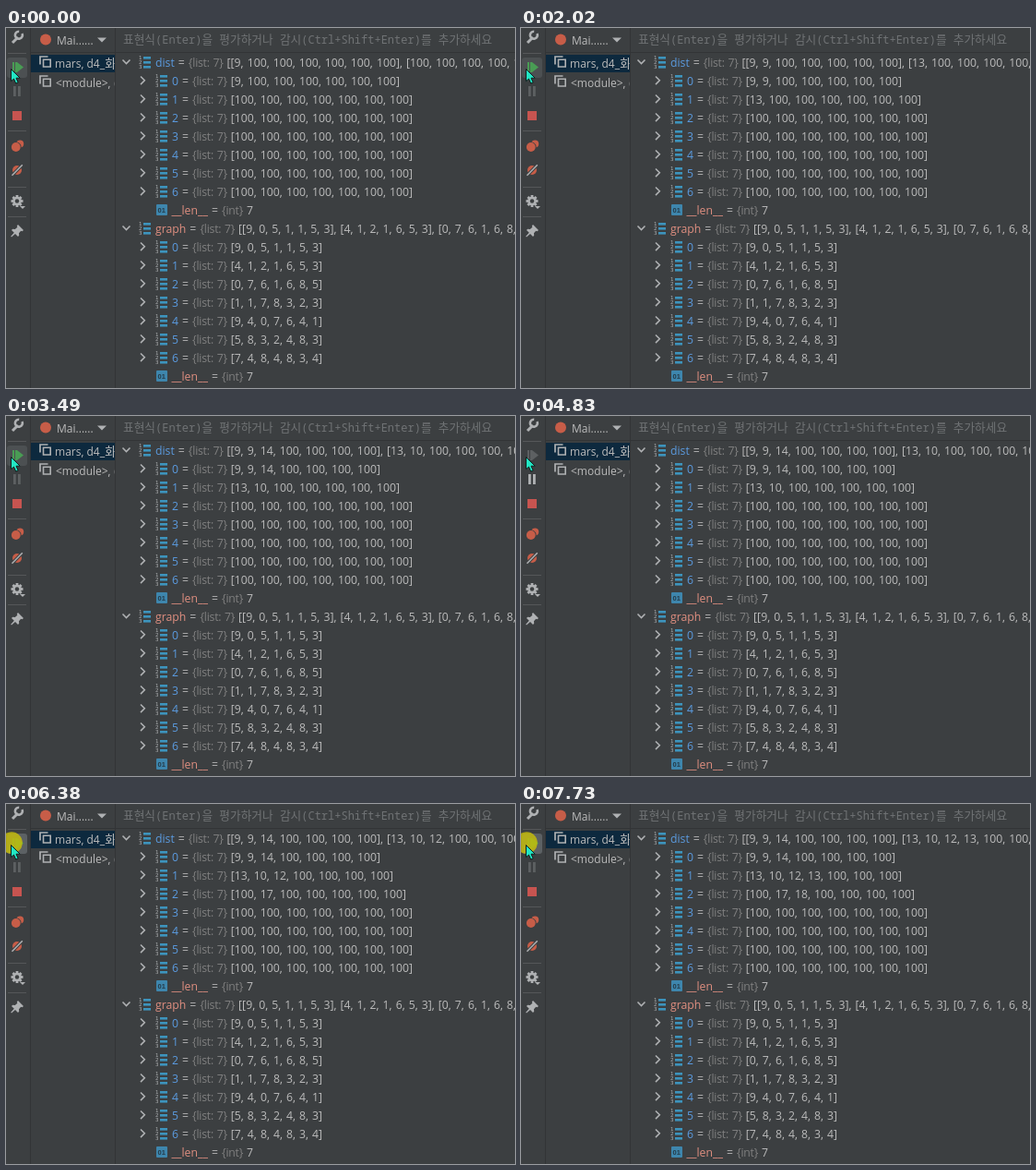
Recreate the animation shown at these times as an HTML page. Size 552 by 390 pixels, loop 7.99 s.

```html
<!DOCTYPE html>
<html lang="ko">
<head>
<meta charset="utf-8">
<title>Debugger</title>
<style>
html, body { margin: 0; width: 100%; height: 100%; overflow: hidden; background: #3c3f41; }
svg { display: block; width: 552px; height: 390px; }
text { font: 12.25px "Open Sans", "Noto Sans CJK KR", sans-serif; word-spacing: .85px; fill: #bbb; white-space: pre; }
.ko { font: 13px "Noto Sans CJK KR", "Noto Sans CJK", sans-serif; }
.small { font-size: 12px; word-spacing: 0; }
.prompt { font: 12px "Noto Sans Mono", "DejaVu Sans Mono", monospace; word-spacing: 0; fill: #707375; }
.prompt .ko { font-size: 12.7px; }
.name { fill: #e08f80; }
.item { fill: #5b9be0; }
.type { fill: #808080; letter-spacing: -.23px; }
.tiny { font: 5.5px "DejaVu Sans", sans-serif; fill: #afb1b3; }
.bits { font: bold 7.5px "Liberation Sans", sans-serif; fill: #253b49; word-spacing: 0; }
</style>
</head>
<body>
<svg id="stage" viewBox="0 0 552 390"></svg>
<script>
const LOOP = 7990;
const GREY = '#afb1b3';
const RED = '#c75d48';

const graph = ['9051153', '4121653', '0761685', '1178323', '9407641', '5832483', '7484834']
  .map(row => [...row]);

// Cells written before each pause: row, column, value
const writes = [
  [[0, 0, 9]],
  [[0, 1, 9], [1, 0, 13]],
  [[0, 2, 14], [1, 1, 10]],
  [[1, 2, 12], [2, 1, 17]],
  [[1, 3, 13], [2, 2, 18]]
];

// Start time, variables view, button state
const steps = [
  [0, 'pause0', 'on'],
  [1470, 'pause0', 'press'], [1600, 'pause0', 'off'], [1670, 'empty', 'off'],
  [1740, 'wait', 'off'], [1810, 'pause1', 'off'], [2020, 'pause1', 'on'],
  [3020, 'pause1', 'press'], [3150, 'pause1', 'off'], [3220, 'empty', 'off'],
  [3290, 'wait', 'off'], [3360, 'pause2', 'off'], [3490, 'pause2', 'on'],
  [4700, 'pause2', 'press'], [4830, 'pause2', 'off'], [4900, 'empty', 'off'],
  [4970, 'wait', 'off'], [5040, 'pause3', 'on'],
  [6380, 'pause3', 'press'], [6510, 'pause3', 'off'], [6580, 'empty', 'off'],
  [6650, 'wait', 'off'], [6720, 'pause4', 'off'], [7050, 'pause4', 'on'],
  [7730, 'pause4', 'press']
];

const escapeText = s => s.replace(/&/g, '&amp;').replace(/</g, '&lt;');
const mixed = s => s.split(/([가-힣]+)/)
  .map((part, i) => i % 2 ? `<tspan class="ko">${part}</tspan>` : escapeText(part)).join('');
const span = (cls, s) => `<tspan class="${cls}">${s}</tspan>`;
const text = (x, y, body, cls = '') => `<text x="${x}" y="${y}" class="${cls}">${body}</text>`;
const rect = (x, y, w, h, fill, r = 0) =>
  `<rect x="${x}" y="${y}" width="${w}" height="${h}" rx="${r}" fill="${fill}"/>`;
const dot = (x, y, r, fill) => `<circle cx="${x}" cy="${y}" r="${r}" fill="${fill}"/>`;
const fillPath = (d, fill) => `<path d="${d}" fill="${fill}"/>`;
const line = (d, color, w) => `<path d="${d}" fill="none" stroke="${color}" stroke-width="${w}"/>`;
const group = (id, body) => `<g id="${id}">${body}</g>`;
const list = row => `[${row.join(', ')}]`;

function listIcon(x, y) {
  return [0, 1, 2].map(i =>
    rect(x + 5, y - 6 + i * 5, 8, 2.6, '#3d94bd') +
    text(x, y - 3 + i * 5, i + 1, 'tiny')).join('');
}

function listRow(x, y, name, value, cls, open) {
  const arrow = open
    ? `M${x - 35.5} ${y - 2.5}l4 4 4-4`
    : `M${x - 34} ${y - 4.5}l4.3 4.3-4.3 4.3`;
  return line(arrow, GREY, 1.6) + listIcon(x - 18, y) +
    text(x, y + 4.5, span(cls, name) + ' = ' + span('type', '{list: 7} ') + value);
}

function tree(y, name, rows, cls) {
  let out = listRow(162, y, name, list(rows.map(list)), cls, true);
  rows.forEach((row, i) => {
    out += listRow(180, y + 20 * (i + 1), i, list(row), 'item', false);
  });
  const end = y + 160;
  return out + rect(163, end - 6, 12, 12, '#3e86ad', 1) + text(164.6, end + 2.8, '01', 'bits') +
    text(179.5, end + 4.5, span('name', '__len__') + ' = ' + span('type', '{int} ') + '7');
}

function pauses() {
  const dist = Array.from({ length: 7 }, () => Array(7).fill(100));
  return writes.map((cells, i) => {
    cells.forEach(([r, c, v]) => { dist[r][c] = v; });
    return group('pause' + i, tree(37, 'dist', dist, 'item') + tree(217, 'graph', graph, 'name'));
  }).join('');
}

function waiting() {
  const note = mixed('데이터 수집 중...');
  return group('wait',
    text(144, 42, span('name', 'dist') + ' = ' + note) +
    text(144, 62, span('name', 'graph') + ' = ' + note) +
    text(144, 82, note));
}

const resume = color =>
  rect(7, 37, 2, 11, color) + rect(10, 37, 2, 11, color) + fillPath('M12 37l7 5.5-7 5.5z', color);
const pauseBars = color => rect(8, 63, 2.8, 11, color) + rect(13, 63, 2.8, 11, color);

function buttons() {
  return group('on', rect(1, 32, 22, 22, '#4c5052', 3) + resume('#499c54') + pauseBars('#5d6062')) +
    group('off', resume('#5d6062') + pauseBars(GREY)) +
    group('press', rect(1, 32, 22, 22, '#5c6164', 3) + resume('#499c54') +
      `<circle cx="6" cy="42" r="11.8" fill="#c8be0a" opacity=".82"/>` +
      pauseBars('#5d6062'));
}

function toolbar() {
  const teeth = [0, 45, 90, 135].map(a =>
    `<rect x="10.6" y="181" width="2.8" height="13" fill="${GREY}" transform="rotate(${a} 12 187.5)"/>`).join('');
  return line('M7 16L13 10', GREY, 3) +
    line('M17.5 6A4 4 0 1 1 14.2 3.7', GREY, 2.6) +
    [27, 111, 172, 204].map(y => rect(2, y, 20, 1, '#555759')).join('') +
    rect(7, 90, 10, 10, '#c75450') +
    dot(15.2, 125.5, 4, RED) + dot(10.8, 129, 5.8, '#3c3f41') + dot(10.8, 129, 4.9, RED) +
    dot(12, 154, 5, RED) + line('M6.5 159.8L17.8 148.2', '#3c3f41', 3.4) +
    line('M6.5 159.8L17.8 148.2', GREY, 1.5) +
    teeth + dot(12, 187.5, 4.8, GREY) + dot(12, 187.5, 2.2, '#3c3f41') +
    fillPath('M15 193h6l-3 3z', GREY) +
    fillPath('M13 213l6 6-1.5 1.2-1.3-.4-2.2 2.4.2 2.6-1.2 1.2-3-3-4 3.6-.8-.8 3.6-4-2.8-2.8 1.2-1.2 2.6.2 2.6-2.2-.6-1.4z', GREY);
}

const frameIcon = y =>
  line(`M45.5 ${y + 1}H37V${y + 9.5}`, GREY, 1.7) +
  line(`M40.5 ${y + 4.3}h7.7v7.7h-7.7z`, GREY, 1.6);

function framesPanel() {
  return rect(27, 29, 91, 19, '#0d293e') +
    dot(43, 12.5, 6, RED) + text(55, 17.5, 'Mai......', 'small') + fillPath('M99 10.5h10l-5 5z', GREY) +
    frameIcon(30) + frameIcon(51) +
    `<g clip-path="url(#frames)">` +
    text(53, 42.5, mixed('mars, d4_화성'), 'small') +
    text(54, 63.5, mixed('<module>, d4_화성'), 'small') + '</g>';
}

const stage = document.getElementById('stage');
stage.innerHTML =
  '<clipPath id="frames"><rect x="27" y="27" width="90.5" height="60"/></clipPath>' +
  rect(0, 0, 552, 390, '#3c3f41') + framesPanel() +
  rect(26, 0, 1, 390, '#323436') + rect(118, 0, 1, 390, '#323436') + rect(27, 26, 525, 1, '#323436') +
  text(127, 16.5, mixed('표현식(Enter)을 평가하거나 감시(Ctrl+Shift+Enter)를 추가하세요'), 'prompt') +
  toolbar() + pauses() + waiting() + buttons() +
  '<path d="M5.5 44.5v13.2l3-2.6 2.2 5 2.5-1.1-2.2-4.8h4.2z" fill="#22e6c4" stroke="#10201e"/>';

const parts = [...stage.querySelectorAll('g[id]')];
let shown;

function draw(now) {
  const t = now % LOOP;
  const step = steps.findLast(s => s[0] <= t);
  if (step !== shown) {
    shown = step;
    parts.forEach(g => { g.style.display = step.includes(g.id) ? '' : 'none'; });
  }
}

const start = performance.now();
function tick() {
  draw(performance.now() - start);
  requestAnimationFrame(tick);
}
tick();
</script>
</body>
</html>
```
